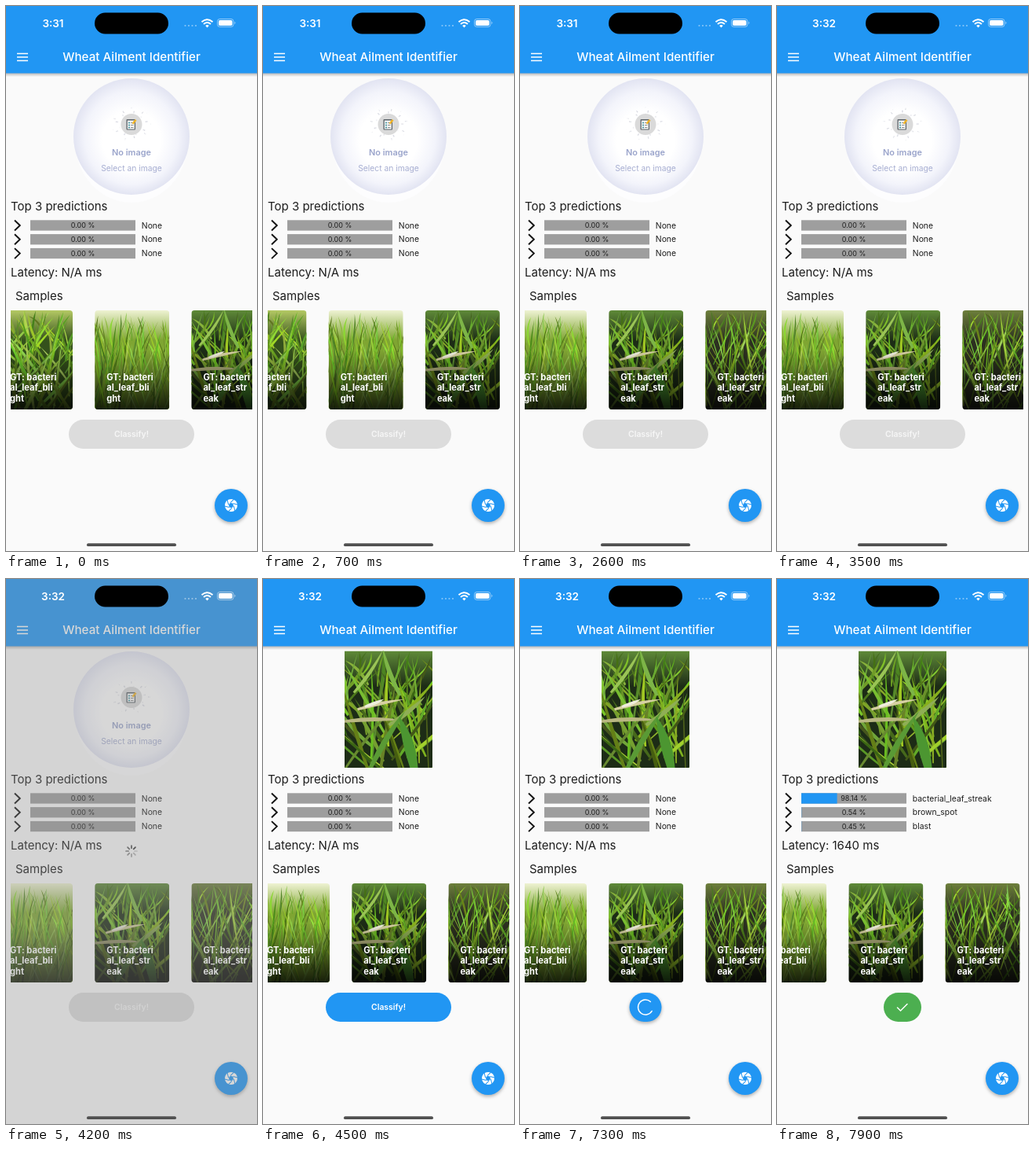
Recreate the animation shown at these times as an HTML page. Size 320 px wide and 693 px high, loop 8 s.

```html
<!DOCTYPE html>
<html lang="en">
<head>
<meta charset="utf-8">
<title>Wheat Ailment Identifier</title>
<style>
  html, body { margin: 0; width: 100%; height: 100%; overflow: hidden; background: #fafafa; }
  svg { display: block; }
  #stage { width: 100vw; height: 100vh; }
  text { font-family: Inter, Roboto, sans-serif; fill: #1d1d1d; }
  .head { font-size: 15px; }
  .small { font-size: 10.4px; }
  .pct { font-size: 9px; text-anchor: middle; }
  .mid { text-anchor: middle; }
  .label { font-size: 11.1px; font-weight: 700; fill: #fff; }
  .raised { filter: drop-shadow(0 2px 2px rgba(0, 0, 0, .3)); }
  .line { fill: none; stroke-linecap: round; }
</style>
</head>
<body>
<svg id="stage" viewBox="0 0 320 693" preserveAspectRatio="none">
  <defs>
    <radialGradient id="moon" cx=".5" cy=".5" r=".5" fy=".56">
      <stop offset=".5" stop-color="#fff"/>
      <stop offset=".8" stop-color="#f3f4fb"/>
      <stop offset="1" stop-color="#e2e4f2"/>
    </radialGradient>
    <linearGradient id="barShade" x2="0" y2="1">
      <stop stop-color="#000" stop-opacity=".28"/>
      <stop offset="1" stop-color="#000" stop-opacity="0"/>
    </linearGradient>
    <linearGradient id="cardShade" x2="0" y2="1">
      <stop offset=".4" stop-color="#000" stop-opacity="0"/>
      <stop offset="1" stop-color="#000" stop-opacity=".82"/>
    </linearGradient>
    <clipPath id="strip"><rect x="6" y="380" width="308" height="140"/></clipPath>
    <clipPath id="cardClip"><rect width="95" height="126" rx="4"/></clipPath>
  </defs>

  <rect width="320" height="693" fill="#fafafa"/>
  <rect y="85" width="320" height="5" fill="url(#barShade)"/>
  <rect width="320" height="85.5" fill="#2196f3"/>
  <path d="M14 60.5h14M14 65h14M14 69.500h14" stroke="#fff" stroke-width="1.6"/>
  <text class="mid" x="160" y="70" font-size="15.2" font-weight="500" style="fill:#fff">Wheat Ailment Identifier</text>

  <g id="empty">
    <ellipse cx="160" cy="172" rx="72" ry="78" fill="#fdfdfe"/>
    <circle cx="160" cy="166" r="74" fill="url(#moon)"/>
    <g id="dots" fill="#c9cbd6"></g>
    <circle cx="160" cy="150.500" r="13.500" fill="#dadada"/>
    <rect x="153.500" y="144" width="11.500" height="13.500" rx="1" fill="#5b6268"/>
    <rect x="154.800" y="145.500" width="9" height="11" fill="#f4f6f6"/>
    <path d="M156 148.500h2M156 151.500h2M156 154.500h2" stroke="#3c8f9c" stroke-width="1.500"/>
    <path d="M159 148.500h3.500M159 151.500h3.500M159 154.500h3.500" stroke="#777" stroke-width=".8"/>
    <path d="M160.500 149l4-5 2 1.500-4 5z" fill="#f0b429"/>
    <text class="mid" x="160" y="189.500" font-size="10.9" font-weight="600" style="fill:#9aa4cb">No image</text>
    <text class="mid" x="160" y="209.700" font-size="10.3" style="fill:#a8afd2">Select an image</text>
  </g>
  <svg id="chosen" x="104" y="91.500" width="112" height="148.500" viewBox="0 0 95 126" preserveAspectRatio="none">
    <use href="#photo2"/>
  </svg>

  <text class="head" x="6" y="260">Top 3 predictions</text>
  <g id="rows"></g>
  <text class="head" id="latency" x="6" y="343.500"></text>
  <text class="head" x="12" y="373.500">Samples</text>
  <g clip-path="url(#strip)"><g id="cards"></g></g>

  <rect id="button" y="526" height="37" rx="18.500"/>
  <text class="mid" id="action" x="160" y="548" font-size="10.4" font-weight="600">Classify!</text>
  <path id="busy" class="line" stroke="#fff" stroke-width="1.400"/>
  <path id="tick" class="line" d="M153.500 545l4 4 8.500-8.500" stroke="#fff" stroke-width="1.500"/>

  <circle class="raised" cx="287" cy="635" r="21" fill="#2196f3"/>
  <g id="shutter" transform="translate(287 635)"><circle r="8" fill="#fff"/></g>

  <g id="dim">
    <rect width="320" height="693" fill="#8d8d8d" opacity=".35"/>
    <g id="spokes" transform="translate(160 346)"></g>
  </g>

  <rect x="113" y="8.500" width="94" height="27" rx="13.500"/>
  <text class="mid" id="clock" x="60" y="26.600" font-size="13.5" font-weight="600" style="fill:#fff"></text>
  <path class="line" d="M228.500 25h15" stroke="#fff" stroke-width="2.200" stroke-dasharray="0 4.500" opacity=".45"/>
  <g class="line" stroke="#fff" stroke-width="2" style="stroke-linecap:butt">
    <path d="M249.500 20.300q7-6 14 0M252 23q4.500-4 9 0"/>
    <path d="M256.500 27.500l-2.300-2.500q2.300-1.800 4.600 0z" fill="#fff" stroke="none"/>
  </g>
  <rect x="269.500" y="16.500" width="20.500" height="10" rx="3" fill="none" stroke="#fff" opacity=".5"/>
  <rect x="271" y="18" width="17.500" height="7" rx="1.800" fill="#fff"/>
  <path d="M291.500 19.800q2 1.700 0 3.400z" fill="#fff" opacity=".6"/>
  <rect x="103" y="683.300" width="114" height="3.800" rx="1.900" fill="#505050"/>
</svg>

<script>
const $ = id => document.getElementById(id);
const add = (parent, html) => parent.insertAdjacentHTML('beforeend', html);
const clamp = v => Math.max(0, Math.min(1, v));
const span = (t, a, b) => clamp((t - a) / (b - a));
const ease = p => p * p * (3 - 2 * p);
const show = (el, alpha) => el.setAttribute('opacity', +alpha);

function random(seed) {
  return () => {
    seed = (seed * 1664525 + 1013904223) >>> 0;
    return seed / 4294967296;
  };
}

// Linear interpolation through [time, value] pairs
function track(keys, t) {
  const i = keys.findIndex(k => k[0] > t);
  if (i === 0) return keys[0][1];
  if (i < 0) return keys[keys.length - 1][1];
  const [a, b] = [keys[i - 1], keys[i]];
  return a[1] + (b[1] - a[1]) * (t - a[0]) / (b[0] - a[0]);
}

// A leaf from its root, by angle from upright, with a sideways bend
function leaf(x, y, len, angle, width, bend, color) {
  const dx = Math.sin(angle), dy = -Math.cos(angle);
  const at = (along, side) =>
    `${(x + dx * along - dy * side).toFixed(1)} ${(y + dy * along + dx * side).toFixed(1)}`;
  return `<path fill="${color}" d="M${at(0, -width * .4)}Q${at(len * .55, bend - width)} ${at(len, 0)}` +
    `Q${at(len * .55, bend + width)} ${at(0, width * .4)}z"/>`;
}

function photo(id, { seed, top, bottom, count, width, spread, light, sky = 0, extra = '' }) {
  const r = random(seed);
  let leaves = '';
  for (let i = 0; i < count; i++) {
    const depth = i / count;
    const root = sky + 22 + depth * 120 + r() * 12;
    const len = Math.min(root - sky * r(), 30 + depth * 40 + r() * 45);
    const color = `hsl(${74 + r() * 22} ${48 + r() * 24}% ${light * (.55 + r() * .75)}%)`;
    leaves += leaf(r() * 115 - 10, root, len, (r() - .5) * spread,
      width * (.4 + r() * .8), (r() - .5) * 14, color);
  }
  add(document.querySelector('defs'),
    `<linearGradient id="${id}bg" x2="0" y2="1"><stop stop-color="${top}"/>` +
    `<stop offset=".3" stop-color="${bottom}"/></linearGradient>` +
    `<g id="${id}"><rect width="95" height="126" fill="url(#${id}bg)"/>${leaves}${extra}</g>`);
}

const streaked =
  leaf(14, 63, 52, 1.36, 3, -2, '#d6d0a2') + leaf(0, 76, 62, 1.55, 3.5, -3, '#b9b782') +
  leaf(22, 60, 22, 1.2, 3, 1, '#efeedd') + leaf(48, 80, 50, .9, 4, 3, '#8fae55') +
  leaf(28, 126, 72, .55, 5, -3, '#5a9a35') + leaf(76, 130, 62, -.28, 9, 3, '#4c9631') +
  leaf(10, 45, 55, .6, 3, 4, '#9ac455') + leaf(60, 48, 55, -.35, 4, -4, '#7db547');

photo('photo0', { seed: 11, top: '#b4c964', bottom: '#35511c', count: 105, width: 2.6, spread: 1.7, light: 46 });
photo('photo1', { seed: 5, top: '#eef2d2', bottom: '#7fa532', count: 130, width: 1.7, spread: .9, light: 47, sky: 14 });
photo('photo2', { seed: 23, top: '#5f8a38', bottom: '#1d2c16', count: 80, width: 3, spread: 1.8, light: 39, extra: streaked });
photo('photo3', { seed: 42, top: '#6d7f3c', bottom: '#2c3020', count: 100, width: 1.8, spread: 1.5, light: 45 });

const kinds = ['bli/ght', 'bli/ght', 'str/eak', 'str/eak'];
kinds.forEach((kind, i) => {
  const [mid, end] = kind.split('/');
  const lines = ['GT: bacteri', 'al_leaf_' + mid, end]
    .map((s, n) => `<text class="label" x="15" y="${89 + n * 13.4}">${s}</text>`).join('');
  add($('cards'), `<g transform="translate(${-10 + i * 123.2} 387)"><g clip-path="url(#cardClip)">
    <rect width="95" height="126" fill="#fafafa"/><use id="pic${i}" href="#photo${i}"/>
    <rect width="95" height="126" fill="url(#cardShade)"/></g>${lines}</g>`);
});
add($('cards').lastElementChild,
  '<path id="loading" class="line" stroke="#2196f3" stroke-width="2"/>');

const results = [['98.14', 'bacterial_leaf_streak'], ['0.54', 'brown_spot'], ['0.45', 'blast']];
results.forEach((_, i) => add($('rows'), `<g transform="translate(0 ${i * 17.8})">
  <path d="M11 272.500l6.800 6.500-6.800 6.500" fill="none" stroke="#111" stroke-width="1.900"/>
  <rect x="31" y="272.300" width="134" height="13.300" fill="#9e9e9e"/>
  <rect id="fill${i}" x="31" y="272.300" height="13.300" fill="#2196f3"/>
  <text class="pct" id="pct${i}" x="98" y="282.200"></text>
  <text class="small" id="name${i}" x="172.800" y="282.700"></text></g>`));

for (let i = 0; i < 6; i++) {
  add($('shutter'), `<path d="M1.700 -3L8.500 -3" stroke="#2196f3" transform="rotate(${i * 60 + 15})"/>`);
}
add($('shutter'), '<circle r="2.900" fill="#2196f3"/>');
for (let i = 0; i < 8; i++) {
  add($('spokes'), `<path class="line" d="M0 -3.800V-7" stroke="#555" stroke-width="1.700" transform="rotate(${i * 45})"/>`);
}
for (let i = 0; i < 36; i++) add($('dots'), '<circle/>');

const swipe = [[300, 0], [400, 2], [500, 8], [600, 18], [700, 29.5], [800, 45], [900, 71],
  [1000, 98], [1100, 114], [1200, 122.2], [1300, 123.2], [7600, 123.2], [7700, 127],
  [7800, 135], [7900, 145]];

function arc(cx, cy, r, from, sweep) {
  const at = a => `${cx + r * Math.sin(a)} ${cy - r * Math.cos(a)}`;
  return `M${at(from)}A${r} ${r} 0 ${+(sweep > Math.PI)} 1 ${at(from + sweep)}`;
}

// Indeterminate ring: the head runs ahead, then the tail catches up
function ring(cx, cy, r, t) {
  const turns = t / 1333 + .5, phase = turns - Math.floor(turns);
  const head = ease(span(phase, 0, .5)), tail = ease(span(phase, .5, 1));
  const from = t / 2222 * 2 * Math.PI + (Math.floor(turns) + tail) * 1.5 * Math.PI;
  return arc(cx, cy, r, from, .15 + (head - tail) * 4.8);
}

function mix(a, b, p) {
  return `rgb(${a.map((v, i) => Math.round(v + (b[i] - v) * p))})`;
}
const GREY = [220, 220, 220], BLUE = [33, 150, 243], GREEN = [76, 175, 80];

const PICKED = 4350, PRESSED = 5500, DONE = 7380;

function drawButton(t) {
  const shrink = ease(span(t, PRESSED, PRESSED + 450));
  const finish = ease(span(t, DONE, DONE + 450));
  const width = 160 - 119 * shrink + 7 * finish;
  const button = $('button');
  button.setAttribute('x', 160 - width / 2);
  button.setAttribute('width', width);
  button.setAttribute('fill', t < DONE ? mix(GREY, BLUE, span(t, PICKED, 4500)) : mix(BLUE, GREEN, finish));
  button.setAttribute('class', t >= PRESSED && t < DONE ? 'raised' : '');
  $('action').style.fill = t < PICKED ? '#f6f6f6' : '#fff';
  show($('action'), 1 - span(t, PRESSED, PRESSED + 200));
  show($('busy'), span(t, PRESSED + 200, PRESSED + 400) * (t < DONE));
  $('busy').setAttribute('d', ring(160, 544.5, 9.5, t - 6000));
  show($('tick'), finish);
}

function drawDots(t) {
  [...$('dots').children].forEach((dot, i) => {
    const p = (i * .381 + t / 2400) % 1;
    const angle = i * 2 * Math.PI / 18 + (i % 2) * .17;
    const reach = 15 + p * 11;
    dot.setAttribute('cx', 160 + reach * Math.cos(angle));
    dot.setAttribute('cy', 150 + reach * .85 * Math.sin(angle));
    dot.setAttribute('r', .5 + .5 * (1 - p));
    show(dot, .8 * Math.sin(Math.PI * p));
  });
}

function draw(t) {
  $('clock').textContent = t < 3000 ? '3:31' : '3:32';
  $('cards').setAttribute('transform', `translate(${-track(swipe, t)} 0)`);

  const loaded = span(t, 900, 1275);
  show($('pic3'), loaded);
  show($('loading'), loaded < 1 ? .6 : 0);
  $('loading').setAttribute('d', ring(47.5, 63, 14, t - 1200));

  const picked = t >= PICKED;
  show($('empty'), !picked);
  show($('chosen'), picked);
  drawDots(t);

  show($('dim'), span(t, 3720, 4000) * (1 - span(t, 4250, 4500)));
  [...$('spokes').children].forEach((spoke, i) => {
    const age = (Math.floor(t / 125) - i + 800) % 8;
    show(spoke, 1 - age * .11);
  });

  const done = t >= DONE;
  results.forEach(([pct, name], i) => {
    $('pct' + i).textContent = (done ? pct : '0.00') + ' %';
    $('name' + i).textContent = done ? name : 'None';
    $('fill' + i).setAttribute('width', 1.34 * pct * span(t, DONE, DONE + 1500));
  });
  $('latency').textContent = `Latency: ${done ? 1640 : 'N/A'} ms`;
  drawButton(t);
}

function tick() {
  draw(Math.floor(performance.now() % 8000 / 100) * 100);
  requestAnimationFrame(tick);
}
tick();
</script>
</body>
</html>
```
